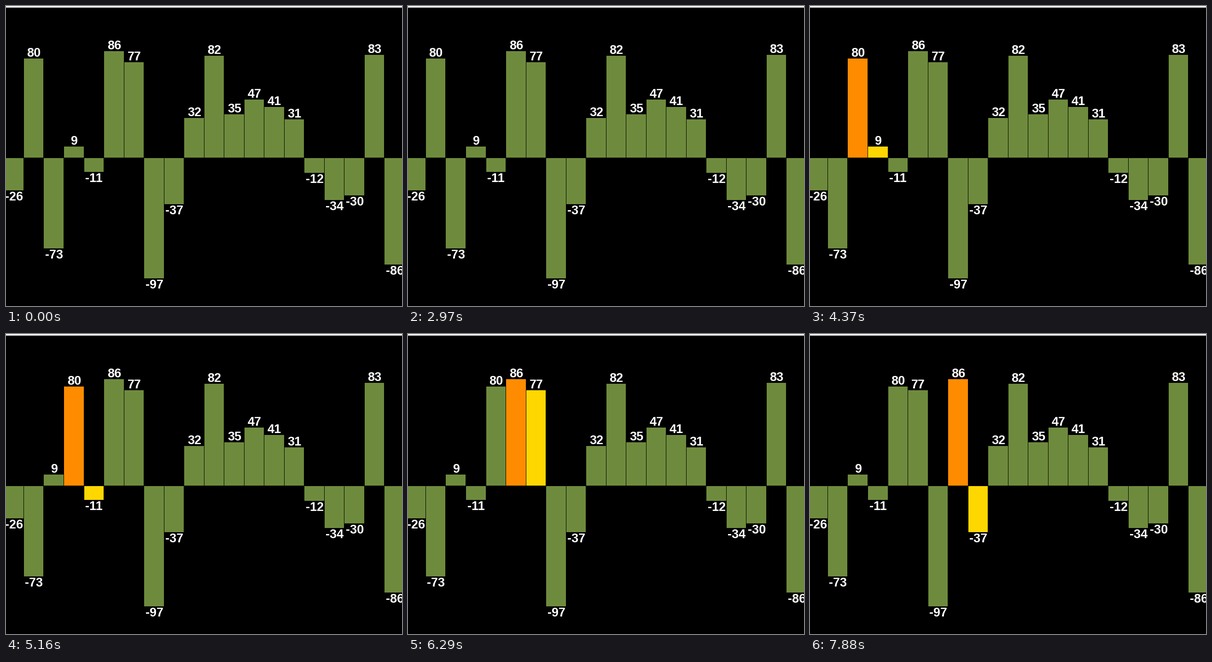
A matplotlib script that plays this animation: 860x651 px, repeating every 8000 ms.

```python
from itertools import accumulate, chain, cycle

import matplotlib.pyplot as plt
from matplotlib.animation import FuncAnimation
from matplotlib.patches import Polygon, Rectangle

W, H, DPI = 860, 651, 100
LOOP, INTERVAL = 8000, 20

GREEN, ORANGE, GOLD, RED = "#6e8b3d", "#ff8c00", "#ffd700", "#cd5c5c"

VALUES = [-26, 80, -73, 9, -11, 86, 77, -97, -37, 32,
          82, 35, 47, 41, 31, -12, -34, -30, 83, -86]
PITCH, LEFT = 43.53, -4.58
UNIT, FLOOR, CEILING = 2.69, 329, 330
SORT_START = 3170

# The pointer follows a small arc in equal hops, then rests and vanishes.
POINTER_START, POINTER_END = 920, 2970
HOPS, HOP_TIME = 5, 66
ARC = [(225.5, 640), (248, 588), (239.5, 629.5)]
ARROW = [(0, 0), (0, 12), (3, 9), (5, 13), (5, 8.5), (8, 8.5)]


def sort_steps(values):
    """Yield (values, colours by slot) for each step of a bubble sort pass."""
    row = list(values)
    for j in range(len(row) - 1):
        yield list(row), {j: ORANGE, j + 1: GOLD}
        if row[j] > row[j + 1]:
            row[j], row[j + 1] = row[j + 1], row[j]
            yield list(row), {j: RED, j + 1: RED}


def step_times():
    """Steps fall in a slightly uneven rhythm of four beats."""
    return accumulate(chain([SORT_START, 400], cycle([400, 400, 330, 460])))


def bezier(a, b, c, t):
    return (1 - t) ** 2 * a + 2 * t * (1 - t) * b + t * t * c


def slot_left(i):
    return round(LEFT + PITCH * i)


STEPS = list(zip(step_times(), sort_steps(VALUES)))

fig = plt.figure(figsize=(W / DPI, H / DPI), dpi=DPI, facecolor="black")
ax = fig.add_axes([0, 0, 1, 1])
ax.set(xlim=(0, W), ylim=(H, 0))
ax.axis("off")
ax.add_patch(Rectangle((0, 0), W, 3.5, color="#f7fbfa", lw=0, snap=False))

bars, labels = [], []
for i in range(len(VALUES)):
    x, width = slot_left(i), slot_left(i + 1) - slot_left(i) - 1
    bars.append(ax.add_patch(Rectangle((x, FLOOR), width, 0, lw=0, snap=False)))
    labels.append(ax.text(LEFT + PITCH * (i + 0.5), 0, "", color="white",
                          family="Liberation Sans", weight="bold",
                          size=27 * 72 / DPI, ha="center", va="baseline"))

pointer = ax.add_patch(Polygon(ARROW, closed=True, fc="black", ec="white",
                               lw=0.72, joinstyle="miter", snap=False))


def show_bar(bar, label, value, colour):
    length = round(abs(value) * UNIT)
    top = FLOOR - length if value > 0 else CEILING
    bar.set_y(top)
    bar.set_height(length)
    bar.set_facecolor(colour)
    label.set_text(str(value))
    label.set_y(top - 4 if value > 0 else top + length + 22)


def update(frame):
    now = frame * INTERVAL + INTERVAL // 2
    row, colours = VALUES, {}
    for start, step in STEPS:
        if now >= start:
            row, colours = step
    for i, value in enumerate(row):
        show_bar(bars[i], labels[i], value, colours.get(i, GREEN))

    hop = min(max((now - POINTER_START) // HOP_TIME, 0), HOPS)
    px, py = (bezier(*axis, hop / HOPS) for axis in zip(*ARC))
    pointer.set_xy([(px + dx, py + dy) for dx, dy in ARROW])
    pointer.set_visible(POINTER_START <= now < POINTER_END)
    return [*bars, *labels, pointer]


anim = FuncAnimation(fig, update, frames=LOOP // INTERVAL, interval=INTERVAL,
                     repeat=True, repeat_delay=0, blit=False)
plt.show()
```
